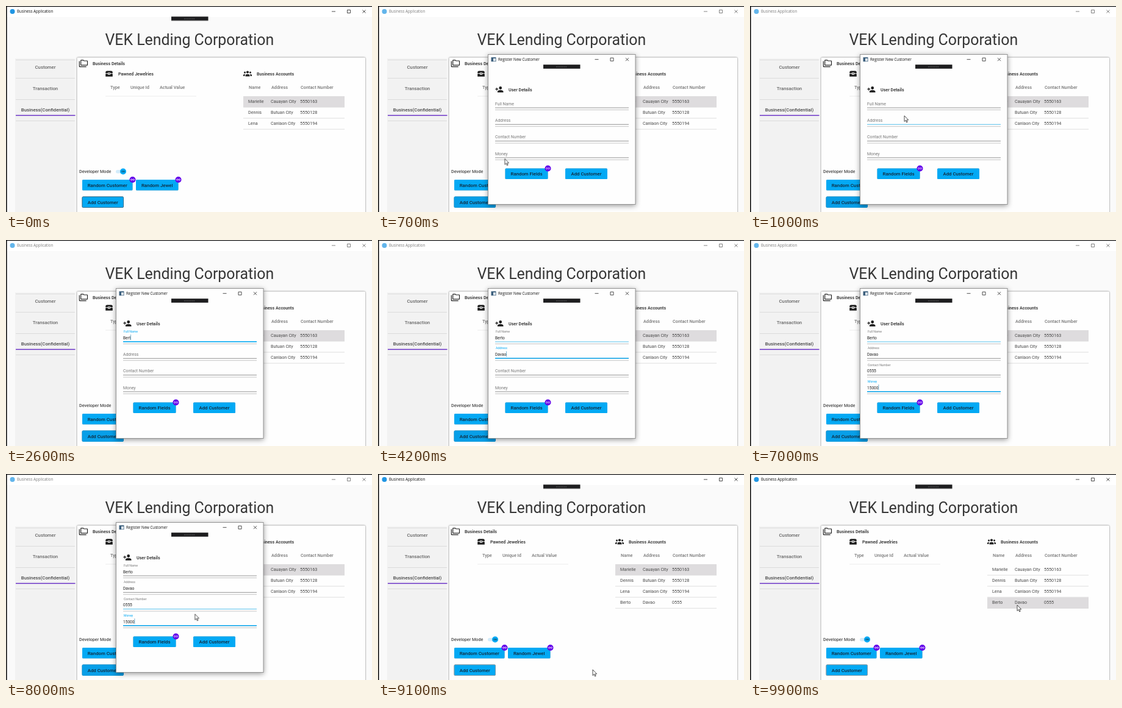
An HTML page that plays this animation: 600 by 338 pixels, repeating every 10 s.

```html
<!DOCTYPE html>
<html lang="en">
<head>
<meta charset="utf-8">
<title>Business Application</title>
<style>
html, body { margin: 0; width: 100%; height: 100%; overflow: hidden; background: #fafafa; }
svg { display: block; width: 100vw; height: 100vh; }
text { font: 7.2px Roboto, sans-serif; fill: #484848; white-space: pre; }
.mid { text-anchor: middle; }
.caption { font: 6.2px "Open Sans", sans-serif; fill: #111; }
.brand { font-size: 24.9px; fill: #363636; }
.tab { font-size: 7.8px; font-weight: 500; fill: #666; }
.bold { font-size: 7.1px; font-weight: 700; fill: #414141; }
.head { font-size: 7.3px; font-weight: 500; fill: #777; }
.btn text { font-size: 7.8px; font-weight: 500; fill: #12283a; }
.btn rect { fill: #03a9f4; filter: drop-shadow(0 .6px .7px #0005); }
.controls { fill: none; stroke: #222; stroke-width: .8; }
.rule { stroke: #d9d9d9; stroke-width: .8; }
.label { font-size: 7.1px; fill: #777; }
.value { font-size: 6.6px; fill: #222; }

/* One loop is 10 s for every part. */
.window, .caption.main, .main-controls, .logo, .main-tab, .new-row, .old-pick, .new-pick,
.add rect, .pointer, .arrow, .ibeam { animation: 10s linear infinite; }
.window { animation-name: window; }
.caption.main { animation-name: dim-text; animation-timing-function: step-end; }
.main-controls, .logo { animation-name: dim; animation-timing-function: step-end; }
.main-tab { animation-name: main-tab; animation-timing-function: step-end; }
.new-row { animation-name: new-row; animation-timing-function: step-end; }
.old-pick { animation-name: old-pick; animation-timing-function: step-end; }
.new-pick { animation-name: new-pick; animation-timing-function: step-end; }
.add rect { animation-name: add; }
.pointer { animation-name: pointer; animation-timing-function: ease-in-out; }
.arrow { animation-name: arrow; animation-timing-function: step-end; }
.ibeam { animation-name: ibeam; animation-timing-function: step-end; }

@keyframes window { 0%, 5% { opacity: 0 } 6.5%, 85% { opacity: 1 } 86%, 100% { opacity: 0 } }
@keyframes dim-text { 0% { fill: #111 } 5% { fill: #7c7c7c } 85.5%, 100% { fill: #111 } }
@keyframes dim { 0% { opacity: 1 } 5% { opacity: .7 } 85.5%, 100% { opacity: 1 } }
@keyframes main-tab { 0% { opacity: 1 } 5% { opacity: 0 } 85.5%, 100% { opacity: 1 } }
@keyframes new-row { 0% { opacity: 0 } 86%, 100% { opacity: 1 } }
@keyframes old-pick { 0% { opacity: 1 } 97.6%, 100% { opacity: 0 } }
@keyframes new-pick { 0% { opacity: 0 } 97.6%, 100% { opacity: 1 } }
@keyframes add {
  0%, 3% { fill: #03a9f4; stroke: #2b6f90 }
  6%, 85% { fill: #079fe8; stroke: #0a97da }
  87%, 100% { fill: #03a9f4; stroke: #7d9aa8 }
}
@keyframes pointer {
  0% { transform: translate(165px, 345px) }
  2.5%, 4.5% { transform: translate(162px, 322px) }
  9.5%, 12% { transform: translate(253px, 180px) }
  18%, 73% { transform: translate(248px, 162px) }
  79.5%, 80.5% { transform: translate(309.7px, 229.7px) }
  83%, 86% { transform: translate(341px, 276px) }
  90.5%, 92.5% { transform: translate(352px, 321px) }
  97%, 100% { transform: translate(438px, 215px) }
}
@keyframes arrow { 0% { opacity: 1 } 17% { opacity: 0 } 78.5%, 100% { opacity: 1 } }
@keyframes ibeam {
  0% { opacity: 0 } 17% { opacity: 1 } 22.7% { opacity: 0 }
  31% { opacity: 1 } 34% { opacity: 0 } 46% { opacity: 1 } 49% { opacity: 0 }
  54.8% { opacity: 1 } 60% { opacity: 0 } 73% { opacity: 1 } 78.5%, 100% { opacity: 0 }
}
</style>
</head>
<body>
<svg viewBox="0 0 600 338">
  <defs>
    <g id="debug-tab">
      <rect width="60.5" height="6.6" fill="#1d1d1f"/>
      <path d="M21 3.6h18" stroke="#777" stroke-width=".8" stroke-dasharray="1.6 1"/>
    </g>
    <g id="controls">
      <path d="M-28 0h6M-2.5-2.5h5v5h-5ZM22.5-2.5l5 5m0-5l-5 5"/>
    </g>
    <g id="badge">
      <circle r="5" fill="#6200ea"/>
      <path d="M0 0C-1-1.6-3-1.6-3 0S-1 1.6 0 0 3-1.6 3 0 1 1.6 0 0Z" fill="none" stroke="#fff" stroke-width=".8"/>
    </g>
  </defs>

  <rect width="600" height="338" fill="#fafafa"/>
  <rect width="600" height="18" fill="#fff"/>
  <circle class="logo" cx="10.5" cy="9" r="4" fill="#2196e3"/>
  <text class="caption main" x="18" y="11.4">Business Application</text>
  <g class="main-controls"><use href="#controls" class="controls" x="562" y="9"/></g>
  <use class="main-tab" href="#debug-tab" x="271" y="17.4"/>
  <text class="brand mid" x="300.8" y="64">VEK Lending Corporation</text>

  <rect x="15" y="86" width="98" height="252" fill="#f2f2f2"/>
  <path d="M16 88.5h97M16 118.5h97M16 153.5h97M16 188.5h97" stroke="#d6d6d6" stroke-width=".8"/>
  <text class="tab mid" x="64.5" y="103.3">Customer</text>
  <text class="tab mid" x="64.5" y="138.3">Transaction</text>
  <text class="tab mid" x="64.5" y="173.3" style="fill:#484848">Business(Confidential)</text>
  <rect x="16" y="178.8" width="97.5" height="1.4" fill="#6226c4"/>

  <rect x="116.5" y="84.5" width="472.5" height="262" rx="1.5" fill="#fefefe" style="filter:drop-shadow(0 .4px 1.3px #0009)"/>
  <path transform="translate(119.7 87) scale(.6)" fill="#222" d="M22 4H14L12 2H6A2 2 0 0 0 4 4V16A2 2 0 0 0 6 18H22A2 2 0 0 0 24 16V6A2 2 0 0 0 22 4M22 16H6V4H11.2L13.2 6H22M2 6H0V20A2 2 0 0 0 2 22H20V20H2Z"/>
  <text class="bold" x="142" y="96.7">Business Details</text>

  <path d="M163.200 110.300v-1.200a2.500 2.500 0 0 1 2.500-2.500h6.600a2.500 2.500 0 0 1 2.500 2.500v1.200h-3.800v-1h-4v1ZM163.200 111.300h3.800v1.500h4v-1.500h3.800v4.500h-11.600Z" fill="#1b1b1b"/>
  <rect x="168.300" y="110" width="1.400" height="1.800" fill="#1b1b1b"/>
  <text class="bold" x="184" y="113.6">Pawned Jewelries</text>
  <text class="head" x="171" y="136.2">Type</text>
  <text class="head" x="204" y="136.2">Unique Id</text>
  <text class="head" x="252" y="136.2">Actual Value</text>
  <path d="M163 148h149" stroke="#e8e8e8" stroke-width=".8"/>

  <g fill="#222">
    <circle cx="396" cy="108.5" r="2.1"/><circle cx="391.5" cy="109" r="1.5"/><circle cx="400.5" cy="109" r="1.5"/>
    <path d="M392.5 115.5v-1.5c0-3 7-3 7 0v1.5ZM389 115v-1.3c0-1.5 1.2-2 2.9-2q-.6 1-.5 3.3ZM403 115v-1.3c0-1.5-1.2-2-2.9-2q.6 1 .5 3.3Z"/>
  </g>
  <text class="bold" x="411" y="113.6">Business Accounts</text>
  <text class="head" x="398" y="136.2">Name</text>
  <text class="head" x="435" y="136.2">Address</text>
  <text class="head" x="483" y="136.2">Contact Number</text>
  <g id="rows"></g>

  <text x="120" y="274" style="font-weight:500">Developer Mode</text>
  <rect x="180" y="269" width="14" height="5.5" rx="2.7" fill="#d3ecfb"/>
  <circle cx="192" cy="271.5" r="5" fill="#03a9f4"/>
  <text class="mid" x="192" y="273" style="font-size:4px;font-weight:700;fill:#134a66">ON</text>
  <g id="buttons"></g>

  <g class="window">
    <rect x="180.5" y="79.5" width="241.5" height="246" fill="#fefefe" stroke="#8a8a8a" stroke-width=".9" style="filter:drop-shadow(0 2px 4px #0006)"/>
    <rect x="185.5" y="84.2" width="8" height="7" fill="#3c5f7d"/>
    <rect x="189" y="86" width="3.7" height="4.5" fill="#e8eef3"/>
    <text class="caption" x="197" y="90.2">Register New Customer</text>
    <use href="#controls" class="controls" x="383.5" y="87.7"/>
    <use href="#debug-tab" x="271" y="96.2"/>
    <path transform="translate(191.7 129.7) scale(.6)" fill="#1b1b1b" d="M15 14c-2.700 0-8 1.300-8 4v2h16v-2c0-2.700-5.300-4-8-4M6 10V7H4v3H1v2h3v3h2v-3h3v-2M15 12a4 4 0 0 0 0-8 4 4 0 0 0 0 8Z"/>
    <text class="bold" x="214" y="139.7">User Details</text>
    <g id="fields"></g>
    <g id="window-buttons"></g>
  </g>

  <path d="M0 .5H600M.8 0V338" stroke="#151515" stroke-width="1.6"/>
  <g class="pointer">
    <path class="arrow" d="M0 0V9.6L2.2 7.5 3.7 11 5.2 10.3 3.7 7H6.7Z" fill="#fff" stroke="#222" stroke-width=".8"/>
    <path class="ibeam" d="M-1.7-4.3Q0-4.300 0-3.300V3Q0 4-1.700 4M1.700-4.300Q0-4.300 0-3.300M0 3Q0 4 1.700 4" fill="none" stroke="#222" stroke-width=".9"/>
  </g>
</svg>
<script>
const LOOP = 10000, LEFT = 192, WIDTH = 219, BLUE = '#03a9f4';
const byId = id => document.getElementById(id);
const clamp = v => Math.max(0, Math.min(1, v));
const easeOut = p => 1 - (1 - p) ** 2;

const accounts = [
  ['Marielle', 'Cauayan City', '5550163'],
  ['Dennis', 'Butuan City', '5550128'],
  ['Lena', 'Canlaon City', '5550194'],
  ['Berto', 'Davao', '0555']
];
const columns = [397, 434, 482];
byId('rows').innerHTML = accounts.map((cells, i) => {
  const y = 148 + 18.1 * i;
  const pick = i === 0 ? 'old-pick' : i === 3 ? 'new-pick' : '';
  return `<g class="${i === 3 ? 'new-row' : ''}">
    ${pick && `<rect class="${pick}" x="389" y="${y}" width="166" height="18" fill="#dedcde"/>`}
    <path class="rule" d="M389 ${y + 18}h166"/>
    ${cells.map((c, k) => `<text x="${columns[k]}" y="${y + 11}">${c}</text>`).join('')}
  </g>`;
}).join('');

function button(label, x, y, w, badge, cls = '') {
  return `<g class="btn ${cls}"><rect x="${x}" y="${y}" width="${w}" height="17.5" rx="1.5"/>
    <text class="mid" x="${x + w / 2}" y="${y + 11.7}">${label}</text>
    ${badge ? `<use href="#badge" x="${x + w}" y="${y}"/>` : ''}</g>`;
}
byId('buttons').innerHTML =
  button('Random Customer', 125, 285, 82.5, true) +
  button('Random Jewel', 213, 285, 69.5, true) +
  button('Add Customer', 125, 313, 67.5, false, 'add');
byId('window-buttons').innerHTML =
  button('Random Fields', 208.5, 266.5, 70, true) +
  button('Add Customer', 307, 266.5, 69, false);

// focus/blur, key presses and pointer hover spans, in ms
const fields = [
  { label: 'Full Name', text: accounts[3][0], focus: 2100, blur: 3100,
    keys: [2270, 2380, 2480, 2580, 2720], hover: [1600, 7450] },
  { label: 'Address', text: accounts[3][1], focus: 3100, blur: 4600,
    keys: [3400, 3560, 3720, 3900, 4080], hover: [850, 1450] },
  { label: 'Contact Number', text: accounts[3][2], focus: 4600, blur: 5480,
    keys: [4900, 5050, 5180, 5300], hover: [7700, 8050] },
  { label: 'Money', text: '15000', focus: 5480, blur: LOOP,
    keys: [6000, 6180, 6400, 6650, 6900], hover: [0, 0] }
];
byId('fields').innerHTML = fields.map((f, i) => `<g transform="translate(0 ${27.3 * i})">
  <text class="label">${f.label}</text>
  <text class="value" x="${LEFT}" y="162.7"></text>
  <rect class="caret" y="155.2" width=".7" height="9" fill="#3f8fb5"/>
  <path class="base" d="M${LEFT} 167h${WIDTH}" stroke-width=".9"/>
  <path d="M${LEFT} 170.4h${WIDTH}" stroke="#b5b5b5" stroke-width=".8"/>
  <rect class="focus" y="166.1" height="1.4" fill="${BLUE}"/>
</g>`).join('');
fields.forEach((f, i) => {
  const group = byId('fields').children[i];
  for (const part of ['label', 'value', 'caret', 'base', 'focus'])
    f[part + 'El'] = group.querySelector('.' + part);
});

function drawField(f, t) {
  const focused = t >= f.focus && t < f.blur;
  const rise = clamp((t - f.focus) / 200);
  f.labelEl.setAttribute('transform',
    `translate(${LEFT + rise} ${162.6 - 10.6 * rise}) scale(${0.97 - 0.25 * rise})`);
  f.labelEl.style.fill = focused ? BLUE : '';

  const typed = f.keys.filter(k => k <= t);
  f.valueEl.textContent = f.text.slice(0, typed.length);
  const last = typed.length ? typed[typed.length - 1] : f.focus;
  const caretOn = focused && (t - last) % 1060 < 530;
  f.caretEl.setAttribute('opacity', caretOn ? 1 : 0);
  f.caretEl.setAttribute('x', LEFT + (typed.length ? f.valueEl.getComputedTextLength() : 0));

  const grow = easeOut(clamp((t - f.focus) / 220)) * (1 - easeOut(clamp((t - f.blur) / 220)));
  f.focusEl.setAttribute('x', LEFT + WIDTH * (1 - grow) / 2);
  f.focusEl.setAttribute('width', WIDTH * grow);
  const hovered = t >= f.hover[0] && t < f.hover[1];
  f.baseEl.setAttribute('stroke', hovered ? '#45b9e8' : '#8a8a8a');
}

let start;
function frame(now) {
  start ??= now;
  const t = (now - start) % LOOP;
  fields.forEach(f => drawField(f, t));
  requestAnimationFrame(frame);
}
requestAnimationFrame(frame);
</script>
</body>
</html>
```
